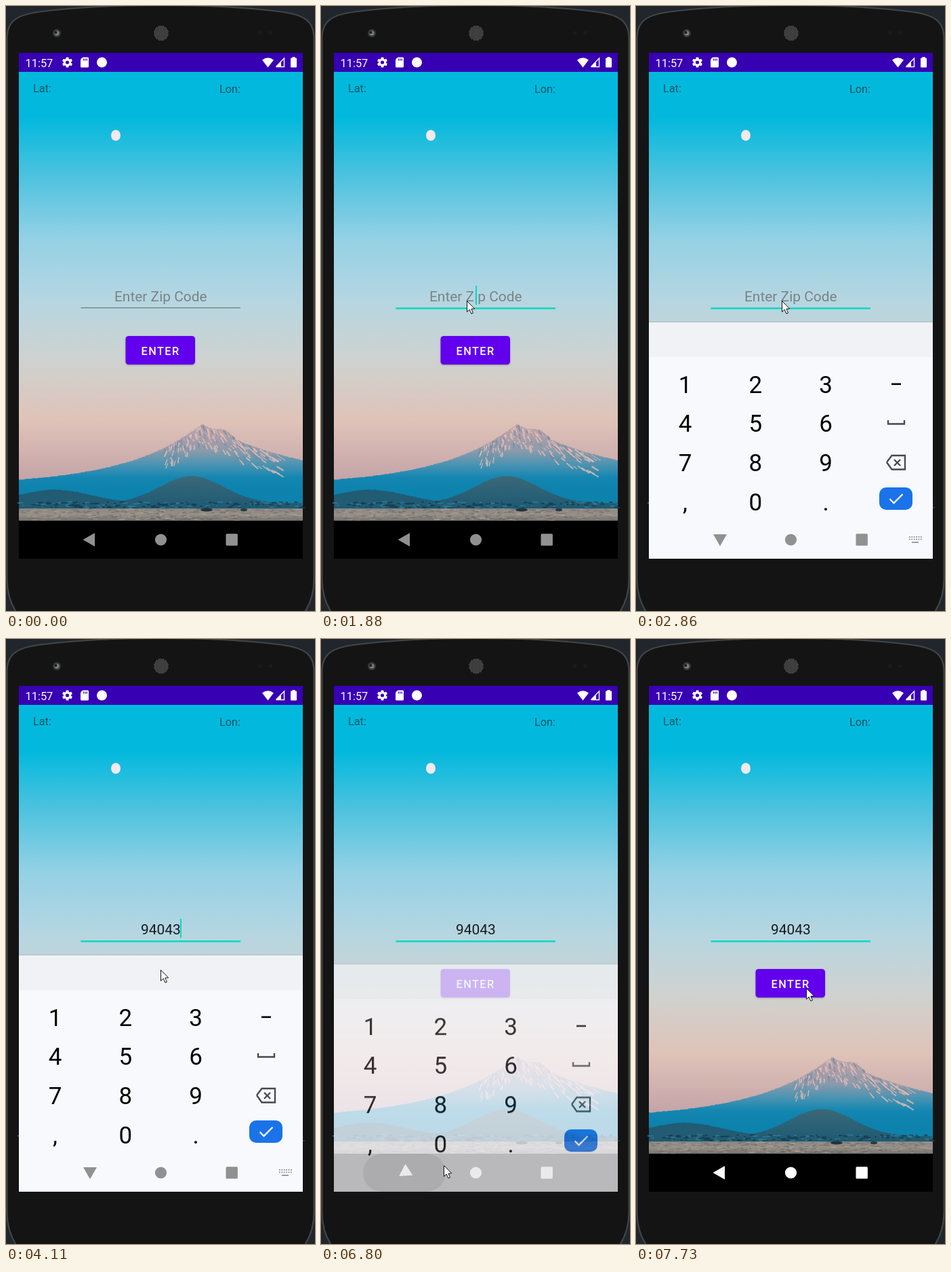
An HTML page with a canvas for the animation above (8000 ms loop, 456 by 891 pixels).

```html
<!DOCTYPE html>
<html lang="en">
<head>
<meta charset="utf-8">
<title>Zip code lookup</title>
<style>
  html, body { margin: 0; width: 100%; height: 100%; overflow: hidden; background: #20262c; }
  canvas { display: block; }
</style>
</head>
<body>
<canvas id="stage" width="456" height="891"></canvas>
<script>
const W = 456, H = 891, LOOP = 8000;
const LEFT = 19, RIGHT = 438, WIDTH = RIGHT - LEFT, TOP = 69, BOTTOM = 814;
const FOCUS = 1810, BLINK = 538, TYPED = 3970, BACK = 6600;
const KEYS_TOP = 466, NAV_Y = 786;
const ctx = document.getElementById('stage').getContext('2d');

// pointer strokes: start and end time, control point, end point
const MOVES = [
  [240, 1000, 221, 458, 221, 458],
  [1070, 1350, 218, 446, 215, 434],
  [3350, 4110, 228, 487, 228, 487],
  [4370, 5110, 283, 600, 338, 714],
  [5180, 5860, 400, 835, 127, 793],
  [BACK, 7400, 251, 793, 251, 514]
];

const ramp = (t, a, b) => Math.min(1, Math.max(0, (t - a) / (b - a)));
const easeOut = (p, n = 2) => 1 - Math.pow(1 - p, n);
const bell = (x, mid, spread) => Math.exp(-(((x - mid) / spread) ** 2));
const bezier = (a, c, b, p) => (1 - p) ** 2 * a + 2 * p * (1 - p) * c + p * p * b;

function randomizer(seed) {
  return () => (seed = (seed * 16807) % 2147483647) / 2147483647;
}

function layer(draw) {
  const c = document.createElement('canvas');
  c.width = W;
  c.height = H;
  draw(c.getContext('2d'));
  return c;
}

function path(g, pts) {
  g.beginPath();
  for (let i = 0; i < pts.length; i += 2) g.lineTo(pts[i], pts[i + 1]);
}

function poly(g, pts, fill) {
  path(g, pts);
  g.closePath();
  g.fillStyle = fill;
  g.fill();
}

function line(g, pts, color, width) {
  path(g, pts);
  g.strokeStyle = color;
  g.lineWidth = width;
  g.stroke();
}

function rect(g, x, y, w, h, fill, r = 0) {
  g.beginPath();
  g.roundRect(x, y, w, h, r);
  g.fillStyle = fill;
  g.fill();
}

function oval(g, x, y, rx, ry, fill) {
  g.beginPath();
  g.ellipse(x, y, rx, ry, 0, 0, 7);
  g.fillStyle = fill;
  g.fill();
}
const dot = (g, x, y, r, fill) => oval(g, x, y, r, r, fill);

function text(g, s, x, y, size, fill, align = 'left', weight = 400) {
  g.font = `${weight} ${size}px Roboto, sans-serif`;
  g.textAlign = align;
  g.fillStyle = fill;
  g.fillText(s, x, y);
}

function fade(g, y0, y1, colors) {
  const grad = g.createLinearGradient(0, y0, 0, y1);
  colors.forEach((c, i) => grad.addColorStop(i / (colors.length - 1), c));
  return grad;
}

// fills the land below a skyline given as a function of x
function land(g, skyline, floor, fill) {
  const pts = [LEFT, floor];
  for (let x = LEFT; x <= RIGHT; x++) pts.push(x, skyline(x));
  poly(g, [...pts, RIGHT, floor], fill);
}

function drawPhone(g) {
  g.fillStyle = '#20262c';
  g.fillRect(0, 0, W, H);
  g.beginPath();
  for (const side of [-1, 1]) {
    const at = x => W / 2 + side * x;
    g.moveTo(at(0), -1);
    g.bezierCurveTo(at(60), -1, at(118), 1, at(178), 8.5);
    g.bezierCurveTo(at(212), 13, at(226.5), 22, at(226.5), 48);
    g.lineTo(at(226.5), 845);
    g.quadraticCurveTo(at(226.5), 872, at(212), 894);
    g.lineTo(at(0), 894);
  }
  g.fillStyle = '#141415';
  g.fill();
  g.strokeStyle = '#414546';
  g.lineWidth = 2.2;
  g.stroke();

  dot(g, 75, 40, 6, '#37383b');
  dot(g, 75, 40, 3.5, '#7b7d84');
  dot(g, 73.5, 39, 2, '#1b1c20');
  for (const x of [375, 390]) dot(g, x, 39.5, 2.8, '#1d191a');

  dot(g, 229, 40, 11, '#1f1f1f');
  for (let j = -5; j <= 5; j++)
    for (let i = -5; i <= 5; i++) {
      const x = i * 2.2 + (j & 1) * 1.1, y = j * 2;
      if (Math.hypot(x, y) < 10.6) dot(g, 229 + x, 40 + y, .75, '#777');
    }
}

function drawPhoto(g) {
  const rnd = randomizer(41);
  rect(g, LEFT, 97, WIDTH, 661, fade(g, 165, 700,
    ['#02b9dd', '#50c3df', '#94d1e5', '#b5d6e1', '#cfd2d0', '#dfc3b8', '#c3a3a7']));
  oval(g, 162, 190.5, 7, 8, '#f3e9ee');

  const ridge = x => 705 - 8 * bell(x, 323, 14)
    - 90 * Math.exp(-Math.abs(x - 289) / (x < 289 ? 112 : 165));
  land(g, x => ridge(x) + rnd(), 742, fade(g, 614, 715,
    ['#c3aaae', '#ab9eaa', '#8b9bac', '#4d94b2', '#1386b1', '#0c82ad']));
  // sunlit gullies fan out from the summit and thin out downhill
  for (let i = 0; i < 210; i++) {
    const x = 235 + rnd() * 165, drop = rnd() ** 2 * 30, y = ridge(x) + 1 + drop;
    const run = 3 + rnd() * 7;
    line(g, [x, y, x + (x - 289) * run * .012 + 2, y + run],
      rnd() < .66 ? 'rgba(236,190,177,.75)' : 'rgba(112,139,160,.6)', 1 + rnd() * 1.4);
  }

  const knoll = x => 732 - 20 * bell(x, 72, 76) + rnd();
  const hill = x => 732 - 40 * bell(x, 274, 67) + rnd();
  land(g, knoll, 742, '#215b74');
  land(g, hill, 742, fade(g, 692, 738, ['#3c6877', '#2c6277', '#1f5a72']));
  for (let i = 0; i < 160; i++)
    oval(g, LEFT + rnd() * WIDTH, 730 + rnd() * 9, 1 + rnd() * 4, 1,
      rnd() < .6 ? '#173f53' : '#2f7590');
  rect(g, LEFT, 740, WIDTH, 18, fade(g, 740, 758, ['#8a8783', '#968f87', '#77726e']));
  for (let i = 0; i < 330; i++)
    rect(g, LEFT + rnd() * 410, 740 + rnd() * 17, 2 + rnd() * 7, 1,
      rnd() < .55 ? 'rgba(85,88,88,.5)' : 'rgba(190,174,158,.5)');
  oval(g, 296, 742, 9, 2.6, '#22343b');
  oval(g, 351, 742, 5, 2.2, '#283c43');
}

function drawStatus(g) {
  const bar = '#3700b3', ink = '#fff';
  rect(g, LEFT, TOP, WIDTH, 28, bar);
  text(g, '11:57', 28.5, 89.5, 16.4, ink);
  g.save();
  g.translate(90.5, 83);
  for (let i = 0; i < 6; i++) {
    rect(g, -2, -7.6, 4, 5, ink, 1);
    g.rotate(Math.PI / 3);
  }
  dot(g, 0, 0, 5.7, ink);
  dot(g, 0, 0, 2.6, bar);
  g.restore();
  rect(g, 110, 75.5, 12, 15, ink, [5, 1.5, 1.5, 1.5]);
  for (let i = 0; i < 3; i++) rect(g, 114 + i * 2.4, 77.5, 1.2, 3, bar);
  dot(g, 141.5, 83, 7.5, ink);

  g.beginPath();
  g.moveTo(386.5, 90.5);
  g.lineTo(378, 79.5);
  g.quadraticCurveTo(386.5, 73, 395, 79.5);
  g.fillStyle = ink;
  g.fill();
  line(g, [398.5, 89.5, 410.5, 89.5, 410.5, 77, 398.5, 89.5], ink, 1.4);
  poly(g, [398, 90, 406, 90, 406, 82], ink);
  rect(g, 420, 76.5, 9, 14, ink, 1);
  rect(g, 422.5, 75, 4, 2, ink);
}

function drawApp(g) {
  drawPhone(g);
  drawPhoto(g);
  drawStatus(g);
  rect(g, LEFT, 758, WIDTH, BOTTOM - 758, '#000');
  text(g, 'Lat:', 40, 127, 16.3, 'rgba(0,0,0,.54)');
  text(g, 'Lon:', 315, 128, 16.3, 'rgba(0,0,0,.54)');
  g.save();
  g.shadowColor = 'rgba(0,0,0,.3)';
  g.shadowBlur = 2.5;
  g.shadowOffsetY = 1;
  rect(g, 176.5, 486, 102.5, 42, '#6200ee', 4.6);
  g.restore();
  g.letterSpacing = '1.46px';
  text(g, 'ENTER', 199.5, 513.5, 16.3, '#fff', 'left', 500);
}

function drawKeys(g) {
  const ink = '#45484c';
  rect(g, LEFT, KEYS_TOP - 1.5, WIDTH, 2, 'rgba(0,0,0,.07)');
  rect(g, LEFT, KEYS_TOP, WIDTH, 348, '#f8f9fc');
  rect(g, LEFT, KEYS_TOP, WIDTH, 51, '#f1f2f5');
  ['123', '456', '789', ',0.'].forEach((row, j) =>
    [...row].forEach((s, i) =>
      text(g, s, 72.5 + i * 103.8, 569.5 + j * 57.8, 35, '#000', 'center')));
  rect(g, 377, 555.5, 14, 2.6, '#000');
  line(g, [372, 610, 372, 615.5, 396, 615.5, 396, 610], ink, 2.3);
  line(g, [370, 672, 377.5, 662, 397, 662, 397, 682.5, 377.5, 682.5, 370, 672], ink, 2.3);
  line(g, [381, 668, 390, 677], ink, 2.3);
  line(g, [390, 668, 381, 677], ink, 2.3);
  rect(g, 359, 709, 49, 33, '#1a73e8', 10);
  line(g, [374.5, 726, 380.5, 732, 393.5, 719], '#fff', 2.3);
}

function drawField(t) {
  const typed = t >= TYPED;
  if (typed) text(ctx, '94043', 228.3, 434.5, 20.95, '#171b1d', 'center');
  else text(ctx, 'Enter Zip Code', 228.3, 434.5, 20.95, '#7b8386', 'center');
  if (t < FOCUS) return rect(ctx, 110.5, 444, 235.5, 1.1, '#606b6f');
  rect(ctx, 110.5, 444, 235.5, 2.4, '#03dac5');
  if (Math.floor((t - FOCUS) / BLINK) % 2 === 0)
    rect(ctx, typed ? 257 : 228, 412, 2, 28, '#03dac5');
}

// 0 when hidden, 1 when fully up
function openness(t) {
  return easeOut(ramp(t, 2010, 2400), 3) - ramp(t, 6660, 6940) ** 2;
}

function drawKeyboard(t, open) {
  if (open <= 0) return;
  ctx.save();
  ctx.beginPath();
  ctx.rect(LEFT, TOP, WIDTH, BOTTOM - TOP);
  ctx.clip();
  ctx.globalAlpha = open;
  ctx.drawImage(keys, 0, (t < BACK ? 92 : 52) * (1 - open));
  ctx.restore();
}

function drawNav(t, open) {
  if (t > BACK)
    rect(ctx, 62, 758, 122, 56, `rgba(0,0,0,${.07 * (1 - ramp(t, 6820, 7150))})`, 28);
  const grey = 145 + 110 * easeOut(ramp(t, BACK, 6960));
  const color = `rgb(${grey},${grey},${grey})`;
  ctx.save();
  ctx.translate(124, NAV_Y - open);
  ctx.rotate(-Math.PI / 2 * Math.pow(open, 3.4));
  poly(ctx, [-10.5, 0, 7, -10, 7, 10], color);
  ctx.restore();
  dot(ctx, 228.5, NAV_Y, 8.6, color);
  rect(ctx, 324.5, NAV_Y - 8.7, 17.4, 17.4, color, 1.5);
  if (t > BACK) return;
  ctx.globalAlpha = open;
  for (let i = 0; i < 12; i++)
    rect(ctx, 403 + i % 6 * 3.4, i < 6 ? 781 : 784.6, 1.7, 1.7, '#85868a');
  rect(ctx, 407, 789, 10, 1.6, '#85868a');
  ctx.globalAlpha = 1;
}

function drawPointer(t) {
  let x = 400, y = 900;
  for (const [from, to, cx, cy, ex, ey] of MOVES) {
    const p = ramp(t, from, to);
    x = bezier(x, cx, ex, p);
    y = bezier(y, cy, ey, p);
    if (p < 1) break;
  }
  ctx.save();
  ctx.translate(Math.round(x) + .5, Math.round(y) + .5);
  poly(ctx, [0, 0, 0, 16, 3.7, 12.6, 6.4, 18.6, 9, 17.5, 6.4, 11.6, 11.2, 11.4], '#fff');
  ctx.strokeStyle = '#111';
  ctx.lineWidth = 1;
  ctx.stroke();
  ctx.restore();
}

const app = layer(drawApp), keys = layer(drawKeys);

function render(t) {
  const open = openness(t);
  ctx.drawImage(app, 0, 0);
  drawField(t);
  drawKeyboard(t, open);
  drawNav(t, open);
  drawPointer(t);
}

const start = performance.now();
function tick() {
  render((performance.now() - start) % LOOP);
  requestAnimationFrame(tick);
}
tick();
</script>
</body>
</html>
```
